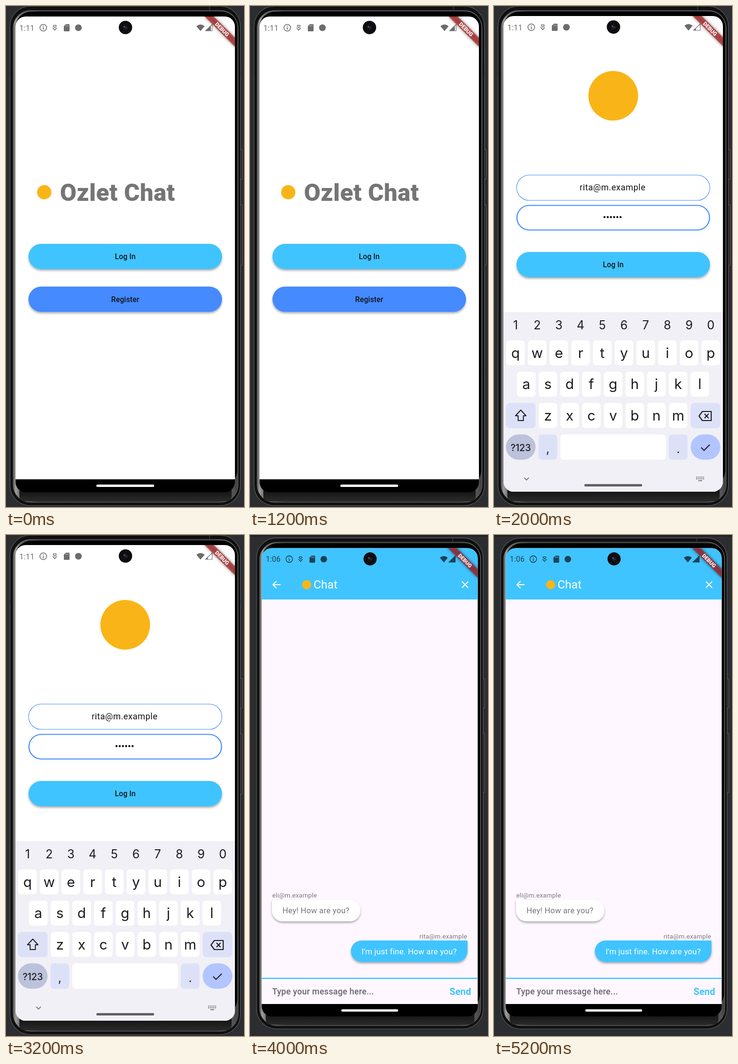
An HTML page for the animation above (6000 ms loop, 498 px wide and 1049 px high).

```html
<!DOCTYPE html>
<html lang="en">
<head>
<meta charset="utf-8">
<style>
  html, body { margin: 0; width: 100%; height: 100%; overflow: hidden; background: #2c2d31; }
  svg { display: block; width: 498px; height: 1049px; font-family: Roboto, sans-serif; }
</style>
</head>
<body>
<svg id="stage" viewBox="0 0 498 1049" xmlns="http://www.w3.org/2000/svg"></svg>
<script>
const SKY = '#40c4ff', BLUE = '#448aff', GOLD = '#f9b517', INK = '#1c1b20';
const HOLD = 2000;

const attrs = o => Object.entries(o).map(([k, v]) => `${k}="${v}"`).join(' ');
const box = (x, y, x2, y2, r, fill, more = {}) =>
  `<rect ${attrs({ x, y, width: x2 - x, height: y2 - y, rx: r, fill, ...more })}/>`;
const dot = (cx, cy, r, fill, more = {}) => `<circle ${attrs({ cx, cy, r, fill, ...more })}/>`;
const path = (d, more) => `<path ${attrs({ d, fill: 'none', ...more })}/>`;
const text = (s, x, y, size, fill, more = {}) =>
  `<text ${attrs({ x, y, 'font-size': size, fill, ...more })}>${s}</text>`;
const group = (body, more) => `<g ${attrs(more)}>${body}</g>`;
const line = (stroke, width) => ({ stroke, 'stroke-width': width });

const MID = { 'text-anchor': 'middle' };
const END = { 'text-anchor': 'end' };
const SHADOW = { filter: 'url(#shadow)' };
const spaced = n => ({ 'letter-spacing': n });

const stops = list => list.map(([o, c]) => `<stop offset="${o}" stop-color="${c}"/>`).join('');

const defs = `<defs>
  <filter id="shadow" x="-10%" y="-30%" width="120%" height="180%">
    <feDropShadow dx="0" dy="3" stdDeviation="2.3" flood-opacity=".32"/></filter>
  <filter id="blur" x="-20%" y="-60%" width="140%" height="220%"><feGaussianBlur stdDeviation="3"/></filter>
  <linearGradient id="rim">${stops([[0, '#4a4a4a'], [.005, '#777'], [.011, '#a0a0a0'],
    [.03, '#6a6a6a'], [.12, '#2a2a2a'], [.9, '#2a2a2a'], [.98, '#555'], [1, '#3a3a3a']])}</linearGradient>
  <linearGradient id="chin" x2="0" y2="1">${stops([[0, '#000'], [.6, '#0c0c0c'], [1, '#2a2a2a']])}</linearGradient>
  <radialGradient id="lens">${stops([[0, '#2c3a48'], [.35, '#15181d'], [1, '#0b0b0d']])}</radialGradient>
  <clipPath id="clip0">${box(20, 22, 479, 1018, 21)}</clipPath>
  <clipPath id="clip1">${box(20, 21, 479, 1017, 21)}</clipPath>
  <clipPath id="clip2">${box(24.5, 27.5, 476.5, 1008, 21)}</clipPath>
</defs>`;

function phone() {
  return box(488, 300, 494, 363, 1.5, '#1b1b1b', line('#747474', 1)) +
    box(488, 416, 494, 543, 1.5, '#1b1b1b', line('#747474', 1)) +
    box(8.5, .5, 490.5, 1046, 42, '#101010', line('#5c5c5c', 1.2)) +
    box(15, 9.5, 485.5, 1039, 36, 'url(#rim)', line('#747474', 1)) +
    box(20, 12, 484, 1004, 32, '#000') +
    box(28, 960, 472, 1037, 10, 'url(#chin)') +
    path('M426 1V8M8.500 135v9M490.500 135v9', line('#4e4e4e', 1));
}

function status(time, color, level) {
  const signal = 'M431.5 38.5V52H417.5Z';
  return text(time, 28, 51.5, 16, color, spaced(.2)) +
    dot(78, 45.5, 7, 'none', line(color, 1.6)) +
    path('M78 44.5V49.5M78 41.3V43', line(color, 1.7)) +
    path('M102 45.5L98.8 42.2Q98.5 39.3 102 40.8Q105.5 39.3 105.2 42.2Z', line(color, 1.4)) +
    path('M97.7 45.5L102 50.5L106.3 45.5', line(color, 1.5)) +
    path('M125.3 38H131.5Q133 38 133 39.5V51.5Q133 53 131.5 53H122.5Q121 53 121 51.5V42.3Z', { fill: color }) +
    path('M125.5 40V43M128 40V43M130.5 40V43', line('#fff8', 1.1)) +
    dot(151.5, 45.5, 7, color) +
    path('M398.5 42.5Q407 35 415.5 42.5L407 52.5Z', { fill: color }) +
    path(signal, { ...line(color, 1.1), 'stroke-linejoin': 'round' }) +
    path(`M${417.5 + 14 * level} ${52 - 13.5 * level}V52H417.5Z`, { fill: color });
}

const lens = () => dot(250, 45, 14, '#0d0d0f') + dot(250, 45, 8, 'url(#lens)') +
  dot(247.5, 43, 1.6, '#536575') + dot(253, 46.5, 1, '#343e49');

function banner() {
  const band = [-46, 31.3, 46, 44.7, 0];
  return group(
    box(...band, '#000', { opacity: .5, filter: 'url(#blur)' }) +
    box(...band, 'rgb(183,28,28)', { opacity: .66 }) +
    text('DEBUG', 0, 42, 11.4, '#fff', { ...MID, 'font-weight': 900 }),
    { transform: 'translate(479 22) rotate(45)' });
}

const overlay = (time, color, level) => status(time, color, level) + lens() + banner();

const button = (label, y, fill) => box(47, y, 452, y + 53, 26.5, fill, SHADOW) +
  text(label, 249.5, y + 32, 15.6, '#10161c', { ...MID, ...spaced(.1), 'font-weight': 500 });

function welcome() {
  return phone() + group(
    box(20, 22, 479, 992, 0, '#fff') +
    box(20, 991, 479, 1018, 0, '#000') +
    box(189, 1002, 310, 1007, 2.5, '#fff') +
    dot(80, 390, 15, GOLD) +
    text('Ozlet Chat', 113, 408, 50, '#757575', { ...spaced(.5), 'font-weight': 900 }) +
    button('Log In', 498, SKY) + button('Register', 587.5, BLUE) +
    overlay('1:11', '#6c6c6c', .8), { 'clip-path': 'url(#clip0)' });
}

function keyboard() {
  const step = 45.4, pale = '#dde1f8';
  const inter = { ...MID, 'font-family': 'Inter, sans-serif' };
  const row = (chars, x, y) => [...chars].map((c, i) =>
    box(x + i * step - 19.5, y, x + i * step + 19.5, y + 52.5, 7, '#fff') +
    text(c, x + i * step, y + 36.5, 29.5, INK, inter)).join('');
  const wide = (x, y, r, fill) => box(x, y, x + 62, y + 53, r, fill);
  const digits = [...'1234567890'].map((c, i) =>
    text(c, 45 + i * step, 677, 25, INK, inter)).join('');
  const small = [0, 1, 2, 3, 4].map(i =>
    box(423 + i * 3.6, 985.5, 425 + i * 3.6, 987.5, 0, '#66656b') +
    box(423 + i * 3.6, 989, 425 + i * 3.6, 991, 0, '#66656b')).join('');
  const round = { 'stroke-linejoin': 'round', 'stroke-linecap': 'round' };

  return box(20, 641, 479, 1018, 0, '#f0f0f6') + digits +
    row('qwertyuiop', 45, 700) + row('asdfghjkl', 67.5, 765.5) + row('zxcvbnm', 113, 831) +
    wide(25, 831, 8, pale) + wide(411.5, 831, 8, pale) +
    path('M56 846L67 858H61.5V868H50.5V858H45Z', { ...line(INK, 2), ...round }) +
    path('M436 849H454.5V868H436L429 858.5Z', { ...line(INK, 2.2), ...round }) +
    path('M440.5 854L449 863M449 854L440.5 863', line(INK, 2.2)) +
    wide(25, 897, 26.5, '#bcc2da') + wide(411.5, 897, 26.5, '#b3c5ff') +
    text('?123', 56, 932, 19.5, INK, { ...inter, 'font-weight': 500 }) +
    box(93, 897, 132, 950, 7, pale) + box(139, 897, 360, 950, 7, '#fff') +
    box(366, 897, 405, 950, 7, pale) +
    text(',', 112.5, 936, 25, INK, inter) + text('.', 385.5, 936, 25, INK, inter) +
    path('M433.5 924.5L439.5 930.5L451.5 918.5', line(INK, 2.2)) +
    path('M63 987.5L68 992.5L73 987.5', line('#66656b', 1.6)) +
    small + box(427.5, 993, 435.5, 994.7, 0, '#66656b') +
    box(189, 1001, 310, 1006, 2.5, '#616065');
}

function login() {
  const bullets = [0, 1, 2, 3, 4, 5].map(i => dot(231.3 + i * 6.7, 442, 2.2, '#111')).join('');
  return phone() + group(
    box(20, 21, 479, 1017, 0, '#fff') +
    dot(249.5, 188, 52, GOLD) +
    box(47.3, 354, 451.7, 407, 26.5, '#fff', line(BLUE, 1.1)) +
    box(48, 417.5, 451, 469, 25.7, '#fff', line(BLUE, 2.2)) +
    text('rita@m.example', 248.3, 386, 17.9, '#111', { ...MID, ...spaced(.56) }) +
    bullets + button('Log In', 515, SKY) + keyboard() +
    group(overlay('1:11', '#6c6c6c', .35), { transform: 'translate(0 -1)' }),
    { 'clip-path': 'url(#clip1)' });
}

function chat() {
  const fit = { transform: 'translate(5.5 5.8) scale(.983)' };
  const note = '#7b757d';
  return box(0, 0, 498, 3, 0, '#1f2023') + group(phone(), fit) + group(
    box(24, 27, 477, 983, 0, '#fef7ff') +
    box(24, 27, 477, 135, 0, SKY) +
    path('M64 104H48.5M55.5 96.5L48 104L55.5 111.5', line('#fff', 2.1)) +
    dot(118.5, 104, 9.5, GOLD) +
    text('Chat', 133, 112, 24.2, '#fff') +
    path('M443.5 97.5L456.5 110.5M456.5 97.5L443.5 110.5', line('#fff', 2.1)) +
    text('eli@m.example', 46.5, 759, 13.2, note, spaced(.275)) +
    path('M46 764H208.5A22.5 22.5 0 0 1 208.5 809H68.5A22.5 22.5 0 0 1 46 786.5Z', { fill: '#fff', ...SHADOW }) +
    text('Hey! How are you?', 68, 792, 16.5, '#757575', spaced(.275)) +
    text('rita@m.example', 454.5, 845, 13.2, note, { ...END, ...spaced(.275) }) +
    path('M455 849H233.5A22.5 22.5 0 0 0 233.5 894H432.5A22.5 22.5 0 0 0 455 871.5Z', { fill: SKY, ...SHADOW }) +
    text("I'm just fine. How are you?", 233.5, 878, 16.5, '#fff', spaced(.275)) +
    box(24, 927, 477, 929.5, 0, SKY) +
    text('Type your message here...', 46.5, 962, 17.6, '#6a656d', { ...spaced(.25), 'font-weight': 500 }) +
    text('Send', 417.5, 962.5, 19.8, SKY, { 'font-weight': 700 }) +
    box(24, 982, 477, 1009, 0, '#000') +
    box(191, 993, 310, 998, 2.5, '#f3eef4') +
    group(overlay('1:06', '#1d4256', 1), fit),
    { 'clip-path': 'url(#clip2)' });
}

const stage = document.getElementById('stage');
stage.innerHTML = defs + box(0, 0, 498, 1049, 0, '#2c2d31') +
  [welcome, login, chat].map(draw => group(draw(), { class: 'scene' })).join('');
const scenes = [...stage.querySelectorAll('.scene')];

function render(ms) {
  const now = Math.floor(ms / HOLD) % scenes.length;
  scenes.forEach((s, i) => { s.style.display = i === now ? '' : 'none'; });
}

const start = performance.now();
function tick() {
  render(performance.now() - start);
  requestAnimationFrame(tick);
}
tick();
</script>
</body>
</html>
```
